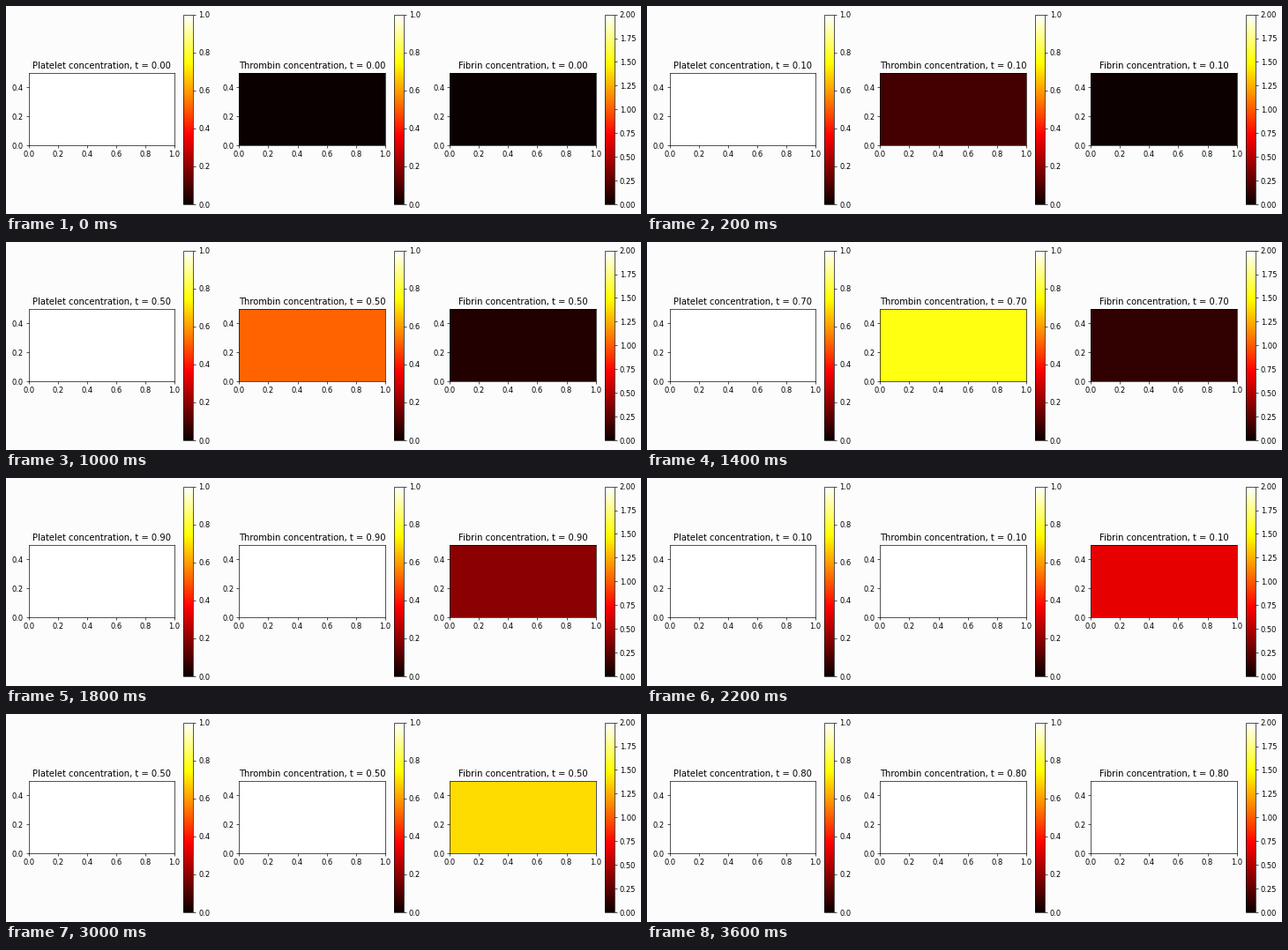
A matplotlib script for the animation above (3800 ms loop, 720x236 px).

```python
import numpy as np
import matplotlib.pyplot as plt
from matplotlib.animation import FuncAnimation

W, H, DPI = 720, 236, 60
FRAMES, INTERVAL, DT = 19, 200, 0.1
PITCH = 238.8

plt.rcParams.update({"font.family": "DejaVu Sans", "font.size": 10})
fig = plt.figure(figsize=(W / DPI, (H + 1e-4) / DPI), dpi=DPI, facecolor="#fcfcfc")


def add_axes(x, y, w, h):
    """Axes placed in pixels, y measured from the top."""
    return fig.add_axes([x / W, 1 - (y + h) / H, w / W, h / H])


def platelet(t):
    return 1.0


def thrombin(t):
    return 0.86 * t + 0.33 * t**2


def fibrin(t):
    return np.interp(t, [0, 0.3, 0.7, 0.9, 1.3, 1.5, 1.8],
                     [0, 0.03, 0.12, 0.386, 0.936, 1.388, 2.2])


def make_panel(i, vmax, step):
    x = 25.6 + i * PITCH
    ax = add_axes(x, 75.9, 165.4, 82.5)
    im = ax.imshow(np.zeros((20, 40)), cmap="hot", vmin=0, vmax=vmax,
                   extent=[0, 1, 0, 0.5], origin="lower", aspect="auto")
    ax.set_xticks(np.arange(0, 1.01, 0.2))
    ax.set_yticks([0, 0.2, 0.4])
    cax = add_axes(x + 175.8, 9.6, 10.8, 215.4)
    fig.colorbar(im, cax=cax, ticks=np.arange(0, vmax + 0.01, step))
    return im, ax.set_title("", fontsize=12)


SPECIES = [
    ("Platelet", platelet, 1, 0.2),
    ("Thrombin", thrombin, 1, 0.2),
    ("Fibrin", fibrin, 2, 0.25),
]
panels = [make_panel(i, vmax, step) for i, (_, _, vmax, step) in enumerate(SPECIES)]


def update(frame):
    artists = []
    clock = frame % 10 * DT  # the label restarts while the values keep growing
    for (name, level, _, _), (im, title) in zip(SPECIES, panels):
        im.set_data(np.full((20, 40), level(frame * DT)))
        title.set_text(f"{name} concentration, t = {clock:.2f}")
        artists += [im, title]
    return artists


anim = FuncAnimation(fig, update, frames=FRAMES, interval=INTERVAL,
                     init_func=lambda: update(0), repeat=True, repeat_delay=0)
plt.show()
```
